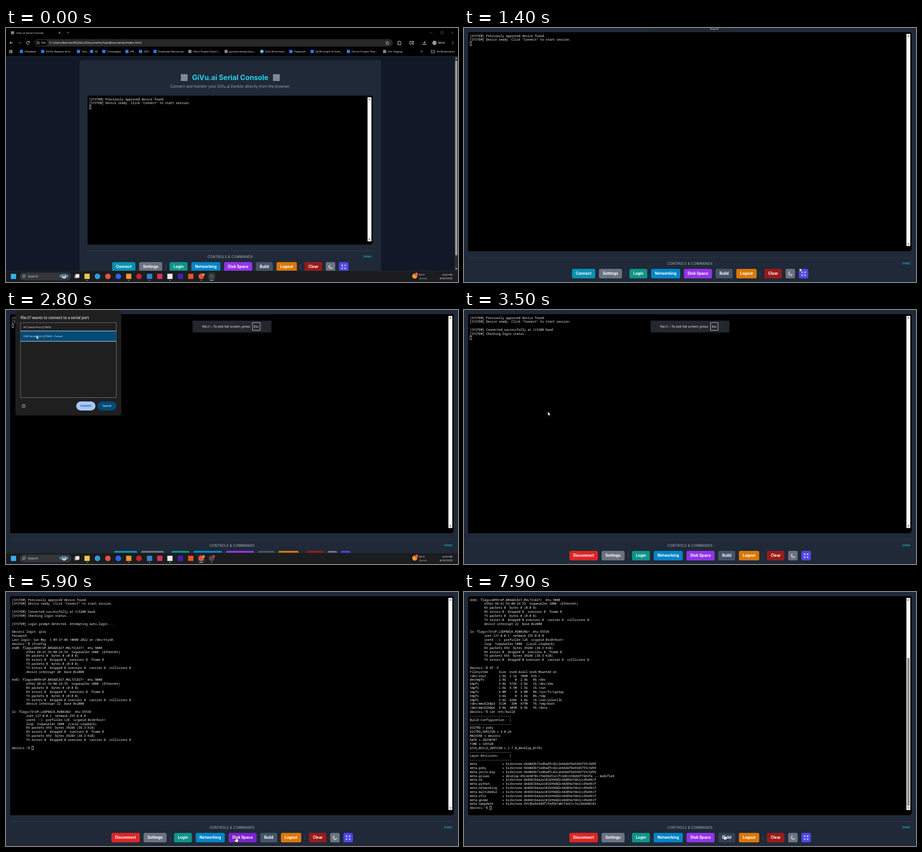
These frames come from a looping animation (998 by 561 pixels, 8000 ms). An HTML page:

```html
<!DOCTYPE html>
<html lang="en">
<head>
<meta charset="utf-8">
<title>Serial Console</title>
<style>
html, body { margin: 0; width: 100%; height: 100%; overflow: hidden; background: #000; }
svg { display: block; width: 100%; height: 100%; }
text { white-space: pre; }
.ui { font-family: "Open Sans", "Noto Sans", sans-serif; }
.page { font-family: Inter, sans-serif; }
.mono { font-family: "Noto Sans Mono", "DejaVu Sans Mono", monospace; }
</style>
</head>
<body>
<svg id="stage" viewBox="0 0 998 561"></svg>
<script>
const LOOP = 8000, FULLSCREEN_AT = 1300;
const ROW = 8.84, COL = 3.99;
const PROMPT = 'davinci:~$ ';

// ---------- drawing helpers ----------
const escapeText = s => s.replace(/&/g, '&amp;').replace(/</g, '&lt;');
const rect = (x, y, w, h, fill, r = 0, more = '') =>
  `<rect x="${x}" y="${y}" width="${w}" height="${h}" rx="${r}" fill="${fill}" ${more}/>`;
const circle = (x, y, r, fill, more = '') => `<circle cx="${x}" cy="${y}" r="${r}" fill="${fill}" ${more}/>`;
const line = (d, color, width = 0.8, more = '') =>
  `<path d="${d}" fill="none" stroke="${color}" stroke-width="${width}" ${more}/>`;
const shape = (d, fill, more = '') => `<path d="${d}" fill="${fill}" ${more}/>`;
const group = (x, y, body, more = '') => `<g transform="translate(${x} ${y})" ${more}>${body}</g>`;
// y is the middle of the capitals
const text = (x, y, s, size, fill, font = 'ui', more = '') =>
  `<text x="${x}" y="${y + size * 0.36}" font-size="${size}" fill="${fill}" class="${font}" ${more}>${escapeText(s)}</text>`;
const MIDDLE = 'text-anchor="middle"', END = 'text-anchor="end"', BOLD = 'font-weight="700"', SEMI = 'font-weight="600"';
const square = (x, y, size, fill) => rect(x - size / 2, y - size / 2, size, size, fill);
const progress = (t, from, to) => Math.min(1, Math.max(0, (t - from) / (to - from)));
const ease = p => p * p * (3 - 2 * p);
const latest = (list, t) => list.filter(item => item[0] <= t).pop();

// ---------- terminal log ----------
const ethernet = (name, mac, irq) => [
  `${name}: flags=4099<UP,BROADCAST,MULTICAST>  mtu 9000`,
  `        ether 68:e1:54:00:24:${mac}  txqueuelen 1000  (Ethernet)`,
  '        RX packets 0  bytes 0 (0.0 B)',
  '        RX errors 0  dropped 0  overruns 0  frame 0',
  '        TX packets 0  bytes 0 (0.0 B)',
  '        TX errors 0  dropped 0 overruns 0  carrier 0  collisions 0',
  `        device interrupt ${irq}  base 0x2000`, ''];
const disk = (name, size, used, avail, use, mount) =>
  name.padEnd(14) + size.padStart(6) + used.padStart(6) + avail.padStart(6) + use.padStart(5) + ' ' + mount;
const heading = s => ['-'.repeat(23), s.padEnd(22) + '|', '-'.repeat(23)];
const layer = (name, revision) => name.padEnd(18) + '= ' + revision;
const POKY = 'kirkstone:6840d3b71ed6adfcd2c2e46daf8a93d3755c5d99';
const OE = 'kirkstone:de8681b4a2a101b99dd2c48d89a7de2ccd9a961f';

const LOG = [
  '[SYSTEM] Previously approved device found.',
  '[SYSTEM] Device ready. Click "Connect" to start session.', '',
  '[SYSTEM] Connected successfully at 115200 baud.',
  '[SYSTEM] Checking login status...', '',
  '[SYSTEM] Login prompt detected. Attempting auto-login...', '',
  'davinci login: givu', 'Password:',
  'Last login: Sun May  1 09:37:08 +0000 2022 on /dev/ttyS0.',
  PROMPT + 'ifconfig',
  ...ethernet('end0', '54', 20), ...ethernet('end1', '55', 22),
  'lo: flags=73<UP,LOOPBACK,RUNNING>  mtu 65536',
  '        inet 127.0.0.1  netmask 255.0.0.0',
  '        inet6 ::1  prefixlen 128  scopeid 0x10<host>',
  '        loop  txqueuelen 1000  (Local Loopback)',
  '        RX packets 693  bytes 39266 (38.3 KiB)',
  '        RX errors 0  dropped 0  overruns 0  frame 0',
  '        TX packets 693  bytes 39266 (38.3 KiB)',
  '        TX errors 0  dropped 0 overruns 0  carrier 0  collisions 0', '',
  PROMPT + 'df -h',
  'Filesystem      Size  Used Avail Use% Mounted on',
  disk('/dev/root', '1.9G', '1.1G', '706M', '61%', '/'),
  disk('devtmpfs', '2.9G', '0', '2.9G', '0%', '/dev'),
  disk('tmpfs', '3.8G', '372K', '3.8G', '1%', '/dev/shm'),
  disk('tmpfs', '1.6G', '8.5M', '1.5G', '1%', '/run'),
  disk('tmpfs', '4.0M', '0', '4.0M', '0%', '/sys/fs/cgroup'),
  disk('tmpfs', '3.8G', '0', '3.8G', '0%', '/tmp'),
  disk('tmpfs', '3.8G', '428K', '3.8G', '1%', '/var/volatile'),
  disk('/dev/mmcblk0p3', '511M', '35M', '477M', '7%', '/tmp/boot'),
  disk('/dev/mmcblk0p6', '9.8G', '405M', '8.9G', '5%', '/data'),
  PROMPT + 'cat /etc/build',
  ...heading('Build Configuration:'),
  'DISTRO = poky', 'DISTRO_VERSION = 4.0.24', 'MACHINE = davinci', 'DATE = 20250707', 'TIME = 185520',
  'GIVU_BUILD_VERSION = 1.7.0_develop_B1781',
  ...heading('Layer Revisions:'),
  ...['meta', 'meta-poky', 'meta-yocto-bsp'].map(name => layer(name, POKY)),
  layer('meta-givuai', 'develop:89c4e3070ccf4d38451e1f13d61338eb6f7483fa -- modified'),
  ...['oe', 'python', 'networking', 'multimedia', 'xfce', 'gnome'].map(name => layer('meta-' + name, OE)),
  layer('meta-swupdate', 'kirkstone:6918be849ddf1fed5b7a0173e51c7a136e8d4101'),
  PROMPT];

// time, last row, characters shown on it
const OUTPUT = [
  [0, 2, 0], [3500, 5, 0], [3700, 7, 0], [3800, 9, 9], [3900, 11, 11],
  [5100, 11, 19], [5200, 37, 11], [6100, 37, 16], [6200, 48, 11], [6900, 48, 25], [7000, 72, 11]];

function terminal(t, x, y, w, h, rows) {
  const [, last, cols] = latest(OUTPUT, t);
  const first = Math.max(0, last + 1 - rows);
  const barX = x + w - 12.4, barY = y + 4.3, barH = rows * ROW, barEnd = barY + barH;
  let out = rect(x, y, w, h, '#000', 4, 'stroke="#374151" stroke-width=".6"');
  for (let row = first; row <= last; row++) {
    const shown = row < last ? LOG[row] : LOG[row].slice(0, cols);
    if (shown) out += text(x + 4.3, y + 8.5 + (row - first) * ROW, shown, 6.65, '#f5f5f5', 'mono', 'font-weight="500"');
  }
  const focused = t >= 3900 && t < 4500;
  const caretX = x + 4.6 + cols * COL, caretY = y + 4.5 + (last - first) * ROW;
  if (!focused) out += rect(caretX, caretY, 3.6, 8, 'none', 0, 'stroke="#fff" stroke-width=".7"');
  else if (t % 1200 < 600) out += rect(caretX, caretY, 4, 8.4, '#fff');
  out += rect(barX, barY, 8.6, barH, '#fcfcfc');
  out += shape(`M${barX + 1.8} ${barY + 6}h5l-2.5-4zM${barX + 1.8} ${barEnd - 6}h5l-2.5 4z`, '#7d7d7d');
  if (first) {
    const track = barH - 18, thumb = track * rows / (last + 1);
    out += rect(barX + 1.7, barEnd - 9 - thumb, 5.2, thumb, '#8b8b8b', 2.6);
  }
  return out + line(`M${x + w - 1} ${y + h - 4}l-3 3M${x + w - 1} ${y + h - 2}l-1 1`, '#777', 0.6);
}

// ---------- page controls ----------
// label, offset from Settings, width, colour, hover colour
const BUTTONS = [
  ['Settings', 0, 50.9, '#6b7280', '#4b5563'], ['Login', 67.2, 39.5, '#0d9488', '#0f766e'],
  ['Networking', 115.1, 64.3, '#0284c7', '#0369a1'], ['Disk Space', 187.6, 62, '#9333ea', '#7e22ce'],
  ['Build', 257.7, 37.4, '#475569', '#334155'], ['Logout', 303.2, 45, '#d97706', '#b45309'],
  ['Clear', 365.2, 38.8, '#991b1b', '#7f1d1d'], ['moon', 412, 21, '#6b7280', '#4b5563'],
  ['expand', 441.2, 21, '#4f46e5', '#4338ca']];
const ICONS = {
  moon: line('M4.2 1.2A4.3 4.3 0 1 1-1.2-4.2A3.5 3.5 0 0 0 4.2 1.2Z', '#fff', 0.9),
  expand: [0, 90, 180, 270].map(a =>
    line('M-4.3-1.6V-4.3H-1.6M-4.3-4.3L-1.2-1.2', '#fff', 1, `transform="rotate(${a})"`)).join('')
};

function layoutAt(t) {
  const full = t >= FULLSCREEN_AT, connected = t >= 3500;
  const settingsX = full ? (connected ? 303.7 : 298) : 294;
  const top = full ? 532 : 517;
  const first = connected ? ['Disconnect', -71, 62.8, '#dc2626', '#b91c1c'] : ['Connect', -59.6, 51.3, '#0891b2', '#0e7490'];
  return { full, settingsX, top, buttons: [first, ...BUTTONS] };
}

function controls(layout, left, right, pointer) {
  const { settingsX, top, buttons } = layout;
  let out = line(`M${left} ${top - 25}H${right}`, '#374151');
  out += text((left + right) / 2, top - 11.5, 'CONTROLS & COMMANDS', 7.25, '#9ca3af', 'page',
    `${MIDDLE} font-weight="500" letter-spacing=".36"`);
  out += text(right - 3.5, top - 11.8, '[Hide]', 6.3, '#22d3ee', 'page', END);
  for (const offset of [59, 356]) out += line(`M${settingsX + offset} ${top + 5}v11`, '#4b5563');
  for (const button of buttons) {
    const [label, offset, w, color, hover] = button, x = settingsX + offset;
    out += rect(x, top, w, 21, button === pointer.over ? hover : color, 3.6);
    out += ICONS[label] ? group(x + w / 2, top + 10.7, ICONS[label])
      : text(x + w / 2, top + 10.3, label, 8.32, '#fff', 'page', `${MIDDLE} ${BOLD}`);
  }
  return out;
}

// ---------- browser window ----------
const BLUE = '#2f7bf0', TILE = '#7d8b94';
const BOOKMARKS = [
  [34, 'Helpdesk', BLUE], [81, '[SCD]: Replace sb-b...', BLUE], [160, 'Tavo', BLUE], [189, 'AE', BLUE],
  [216, 'Crosspages', BLUE], [267, 'VM', BLUE], [297, 'GPU', BLUE], [329, 'Employee Resources', BLUE],
  [406, 'Olmo Project Data C...', TILE], [486, 'givudocreview.paco...', '#85898d'], [565, 'GiVu Rimomatic', '#69b4e4'],
  [629, 'Twigvault', BLUE], [676, 'QX38 Graph Id Sche...', BLUE], [756, 'Dorvin Project Plan...', BLUE],
  [836, 'Doc Staging', TILE]];

function browser(t) {
  const ink = '#f0f0f0', dim = t >= 600 ? ink : '#777';
  let out = rect(0, 0, 998, 63, '#000') + rect(63, 24.5, 791, 16.5, '#282828', 8.2) + rect(65, 26.5, 27, 12.5, '#000', 6.2);
  out += square(14.5, 10.5, 6.5, TILE) + text(23, 10.5, 'GiVu.ai Serial Console', 5.9, ink);
  out += line('M116.2 8.3l4.4 4.4m0-4.4l-4.4 4.4', ink) + line('M134.3 10.5h5.6m-2.8-2.8v5.6', dim);
  out += line('M935.5 10.5h6M960 8h4.6v4.6h-4.6zM983 8l5 5m0-5l-5 5', dim, 0.7);
  out += line('M14.7 32.7H8.5m3-3l-3 3 3 3', ink, 1) + line('M27.2 32.7h6.2m-3-3l3 3-3 3', '#666', 1);
  out += line('M51.3 31a3.2 3.2 0 1 0 .3 2.6M51.6 29v2.4h-2.4', ink, 1);
  out += circle(71, 32.7, 3, 'none', `stroke="${ink}" stroke-width=".7"`) + line('M71 32.3v2M71 30.8v.8', ink);
  out += text(78, 32.7, 'File', 6.2, ink) + text(95.5, 32.7, 'C:/Users/Bernard%20Ko/Documents/Sandbox/serial/index.html', 6.88, ink);
  out += line('M842 29l1.1 2.6 2.9.2-2.2 1.9.7 2.8-2.5-1.5-2.5 1.5.7-2.8-2.2-1.9 2.9-.2z', ink, 0.7);
  out += shape('M865 30.2h2a1.4 1.4 0 0 1 2.8 0h1.9v2.2a1.4 1.4 0 0 1 0 2.6v2H865v-2a1.3 1.3 0 0 0 0-2.6z', 'none', `stroke="${ink}"`);
  out += line('M894 36h-2.2v-6.4h8.4v2.6M895 32.8h2', ink, 1) + circle(897.7, 34.2, 1.8, 'none', `stroke="${ink}"`) + line('M899 35.5l1.8 1.8', ink);
  out += line('M924 28.8v5m-2.3-2.2l2.3 2.3 2.3-2.3M920.5 34.5v2.1h7v-2.1', ink, 1);
  out += circle(946, 32.7, 5, '#5f7fa6') + circle(946, 31.3, 2, '#dca53f') + rect(943, 33.8, 6, 3, '#dca53f', 1.5);
  out += text(954, 32.7, 'Work', 6.2, ink);
  for (const y of [30, 32.7, 35.4]) out += circle(986.5, y, 0.75, ink);
  for (let i = 0; i < 9; i++) out += rect(7.2 + i % 3 * 2.6, 48.6 + Math.floor(i / 3) * 2.6, 1.7, 1.7, ink);
  for (const [x, label, color] of BOOKMARKS) {
    const round = color !== BLUE && color !== TILE;
    out += round ? circle(x, 51.8, 3.8, color) : square(x, 51.8, 7, color);
    out += text(x + 7, 51.8, label, 5.9, ink);
  }
  out += line('M915.3 49.8l2 2-2 2m2.6-4l2 2-2 2', ink, 0.7) + line('M939 49h2.6l1 1h4v5H939z', ink);
  out += text(951, 51.8, 'All Bookmarks', 5.9, ink);
  return out + rect(0, 62, 998, 0.8, '#333');
}

function windowed(t, layout, pointer) {
  let out = rect(0, 62, 998, 499, '#111827') + rect(162.5, 71, 665.5, 500, '#1f2937', 6);
  out += text(495, 109.8, 'GiVu.ai Serial Console', 15.55, '#22d3ee', 'page', `${MIDDLE} ${BOLD}`);
  out += square(393.5, 109.5, 15, TILE) + square(597, 109.5, 15, TILE);
  out += text(495, 129, 'Connect and monitor your GiVu.ai Devkits directly from the browser.', 8.27, '#9ca3af', 'page', MIDDLE);
  out += terminal(t, 179.5, 148.7, 631.2, 330.3, 36) + controls(layout, 179.5, 810.7, pointer);
  out += rect(990.5, 63, 7.5, 473, '#2c2c2c') + rect(991.8, 72, 4.8, 430.5, '#9f9f9f', 2.4);
  out += shape('M991.8 69h4.8l-2.4-4zM991.8 530h4.8l-2.4 4z', '#9f9f9f');
  return out + browser(t) + rect(0, 536, 998, 25, '#202020');
}

function toast(t) {
  if (t < 1400 || t >= 4200) return '';
  const body = rect(412, 23.5, 174, 26, '#23282d') + text(433, 36.3, 'file:// – To exit full screen, press', 7.3, '#fff')
    + rect(544.3, 27.8, 16.8, 17, 'none', 0.8, 'stroke="#fff" stroke-width=".8"') + text(547, 36.3, 'Esc', 7.3, '#fff');
  return group(0, -50 * (1 - ease(progress(t, 1300, 1700))), body, `opacity="${1 - progress(t, 3900, 4200)}"`);
}

function portDialog(t) {
  const picked = t >= 2800;
  let out = rect(20.7, 0.5, 234, 232.5, '#1f1f1f', 5.5);
  out += text(32, 17.3, 'file:/// wants to connect to a serial port', 8.05, '#e3e3e3', 'ui', SEMI);
  out += rect(32, 28, 211.5, 165.5, 'none', 0, 'stroke="#8e8e8e" stroke-width=".8"');
  if (picked) out += rect(32, 46.5, 211.5, 22.5, '#004a77') + line('M32 46.3H243.5M32 69.2H243.5', '#e8eef4', 1);
  out += text(38.5, 38, 'PCI Serial Port (COM3)', 5.95, '#f0f0f0') + text(38.5, 57.7, 'USB Serial Port (COM9) - Paired', 5.95, '#f0f0f0');
  out += circle(39, 212, 3.7, 'none', 'stroke="#e3e3e3" stroke-width=".8"') + text(39, 212, '?', 5.4, '#e3e3e3', 'ui', `${MIDDLE} ${BOLD}`);
  out += rect(155, 202, 42.5, 20, picked ? '#a8c7fa' : '#343536', 10) + rect(201.7, 202, 42.3, 20, '#004a77', 10);
  out += text(176.3, 212, 'Connect', 6.2, picked ? '#12428a' : '#7b7b7b', 'ui', `${MIDDLE} ${SEMI}`);
  return out + text(222.8, 212, 'Cancel', 6.2, '#c2e7ff', 'ui', `${MIDDLE} ${SEMI}`);
}

// ---------- taskbar ----------
// centre, colour, round, running
const APPS = [
  [179, '#f4c64a', 0, 1], [202, '#2a9fd6', 1, 0], [225, '#dd5144', 1, 0], [248, '#2864f0', 1, 0], [271, '#f0962d', 0, 1],
  [293.5, '#c8202c', 1, 0], [317, '#2489d0', 0, 1], [339.5, '#d92f55', 0, 0], [362, '#ececec', 0, 1], [385, '#4320b5', 0, 0],
  [408, '#e95420', 0, 0], [431, '#dd5144', 1, 1], [454, '#4a4a50', 1, 1]];

function taskbar(t) {
  const later = t >= FULLSCREEN_AT, current = later ? 431 : 454, ink = '#f2f2f2';
  let out = rect(0, 536, 998, 25, '#1a1c1f') + rect(0, 536, 998, 0.6, '#303236');
  out += rect(current - 9, 539.5, 18, 18, '#272a2f', 2.5);
  out += square(16.5, 548.7, 11.5, '#35b0ee') + rect(30, 540.3, 114, 17, '#33373c', 8.5);
  out += circle(40, 547.8, 2.7, 'none', `stroke="${ink}" stroke-width=".8"`) + line('M38 549.8l-2.2 2.4', ink);
  out += text(48.5, 548.8, 'Search', 7.1, '#dcdcdc');
  out += '<ellipse cx="128" cy="548" rx="10.5" ry="4.5" fill="#54788f"/>' + circle(128.5, 549, 4.5, '#b4d3e6') + circle(128, 547, 2, '#2d4150');
  out += rect(151, 546, 8, 7, '#777') + rect(153.5, 543.5, 8.5, 8, '#ececec');
  for (const [x, color, round, running] of APPS) {
    out += round ? circle(x, 548.5, 6.2, color) : square(x, 548.5, 11.5, color);
    if (running) out += x === current ? rect(x - 4.2, 556.6, 8.4, 1.6, '#55b8ee', 0.8) : rect(x - 1.6, 556.6, 3.2, 1.4, '#999', 0.7);
  }
  out += circle(436, 544.5, 2.6, '#d8a548');
  if (later) out += circle(458.5, 544.3, 3, '#e03131');
  out += circle(902.5, 548, 5.6, '#f39a2c') + circle(906.5, 543.7, 3.5, '#d7464b') + text(906.5, 543.7, '1', 4.5, '#fff', 'ui', MIDDLE);
  out += text(912, 544.6, '83°F', 6.1, ink) + text(912, 552.6, 'Sunny', 6.1, '#c2c2c2');
  return out + text(986, 544.6, later ? '6:43 PM' : '6:42 PM', 6, ink, 'ui', END) + text(986, 552.6, '8/20/2025', 6, ink, 'ui', END);
}

// ---------- pointer ----------
const PATH = [
  [500, 454, 548], [1100, 741, 530], [1500, 741, 530], [2100, 243, 534.5], [2450, 243, 534.5], [2750, 67, 55.5],
  [2900, 67, 55.5], [3200, 176, 210], [3400, 176, 210], [4200, 384, 539.5], [4500, 384, 539.5], [4900, 451, 540],
  [5200, 451, 540], [5700, 508, 541.5], [6300, 508, 541.5], [6700, 575.5, 536], [LOOP, 575.5, 536]];

function pointerAt(t, layout) {
  if (t < PATH[0][0]) return { hidden: true };
  const i = PATH.findIndex(stop => stop[0] > t), [t0, x0, y0] = PATH[i - 1], [t1, x1, y1] = PATH[i];
  const p = ease(progress(t, t0, t1)), x = x0 + (x1 - x0) * p, y = y0 + (y1 - y0) * p;
  const onRow = y >= layout.top && y <= layout.top + 21;
  const over = onRow && layout.buttons.find(([, offset, w]) => x >= layout.settingsX + offset && x <= layout.settingsX + offset + w);
  return { x, y, over };
}

function drawPointer({ hidden, x, y, over }) {
  if (hidden) return '';
  const d = over
    ? 'M-1 .6Q0-.6 .9.6V4L4 4.8Q5.2 5.2 5 6.6L4.2 11H-1L-3.6 7.5Q-3.8 6-2.5 6.4L-1 7.4Z'
    : 'M0 0V8.8L2.1 6.9 3.6 10.2 4.9 9.6 3.5 6.4H6.3Z';
  return group(x, y, shape(d, '#fff', 'stroke="#111" stroke-width=".6" stroke-linejoin="round"'));
}

// ---------- scene ----------
function scene(t) {
  const layout = layoutAt(t), pointer = pointerAt(t, layout);
  let out;
  if (layout.full) {
    out = rect(0, 0, 998, 561, '#1f2937') + terminal(t, 8.6, 8.7, 980.6, 485, 53) + controls(layout, 8.8, 989.2, pointer) + toast(t);
    if (t >= 2300 && t < 3400) out += taskbar(t);
    if (t >= 2500 && t < 3300) out += portDialog(t);
  } else {
    out = windowed(t, layout, pointer);
    if (t < 900) out += group(0, 25 * ease(progress(t, 700, 900)), taskbar(t));
  }
  return out + drawPointer(pointer);
}

const stage = document.getElementById('stage');
let shown = '';
function tick() {
  const next = scene(performance.now() % LOOP);
  if (next !== shown) stage.innerHTML = shown = next;
  requestAnimationFrame(tick);
}
tick();
</script>
</body>
</html>
```
